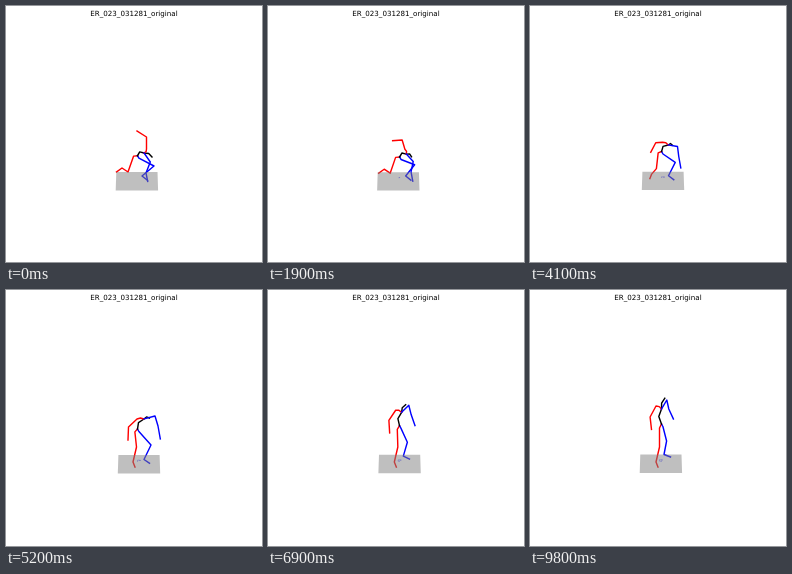
An HTML page for the animation above (9.9 s loop, 256x256 px).

```html
<!DOCTYPE html>
<html lang="en">
<head>
<meta charset="utf-8">
<title>Skeleton motion</title>
<style>
html, body { margin: 0; width: 100%; height: 100%; overflow: hidden; background: #fff; }
svg { display: block; width: 100vw; height: 100vh; }
text { font: 7.11px "DejaVu Sans", sans-serif; text-anchor: middle; text-rendering: geometricPrecision; }
polyline { fill: none; stroke-width: 1.42; stroke-linecap: square; stroke-linejoin: round; }
</style>
</head>
<body>
<svg viewBox="0 0 256 256">
  <text x="128" y="10.4">ER_023_031281_original</text>
  <polyline id="trail" stroke="blue" style="stroke-width:.36"/>
  <polyline id="rightLeg" stroke="red"/>
  <polyline id="leftLeg" stroke="blue"/>
  <polyline id="spine" stroke="black"/>
  <polyline id="rightArm" stroke="red"/>
  <polyline id="leftArm" stroke="blue"/>
  <polygon id="floor" fill="#808080" fill-opacity=".5"/>
</svg>
<script>
const LOOP = 9900, STEP = 100;

// Limbs run from the trunk outwards; hips, collar, neck and back are derived.
const crouch = {
  floor: [[110.3, 166]],
  trunk: [[131.5, 149.7], [138, 147], [146, 151]],
  rightLeg: [[122, 166], [116, 162], [110.5, 166]],
  leftLeg: [[148, 160], [136, 170], [141.5, 174.3]],
  rightArm: [[140.5, 143], [140.5, 131], [131, 125]],
  leftArm: [[144.3, 156], [140, 167], [141.7, 175.5]]
};
const reach = {
  floor: [[112.4, 166.4]],
  trunk: [[131.7, 152], [138.5, 149], [141.5, 150.5]],
  rightLeg: crouch.rightLeg.map(([x, y]) => [x + 0.3, y + 2.2]),
  leftLeg: [[145.5, 157.7], [139, 170], [144, 174]],
  rightArm: [[134, 143.5], [129, 136.5], [119.5, 142.5]],
  leftArm: [[146, 155], [145.5, 165], [147.3, 175]]
};
const bent = {
  floor: [[112.4, 165]],
  trunk: [[131.5, 139], [138, 129], [143.5, 128]],
  rightLeg: [[130.5, 157], [127, 172], [129, 177]],
  leftLeg: [[145, 155], [138, 169.5], [143.5, 173.3]],
  rightArm: [[131, 129], [122.5, 137], [122, 150]],
  leftArm: [[149, 126], [152, 136], [154.3, 149]]
};
const upright = {
  floor: [[110.3, 164.6]],
  trunk: [[131.5, 134], [131.5, 119], [134.8, 108.3]],
  rightLeg: bent.rightLeg.map(([x, y]) => [x - 1, y]),
  leftLeg: [[136.6, 151], [134, 164.5], [140.5, 167]],
  rightArm: [[126, 116], [120.1, 127], [121.5, 139.4]],
  leftArm: [[136.8, 110], [138.8, 119], [143.4, 129]]
};
const moves = [
  { from: crouch, to: reach, start: 0, end: 3000, power: 1.3 },
  { from: reach, to: bent, start: 3000, end: 5200, power: 1 },
  { from: bent, to: upright, start: 5200, end: 8500, power: 0.6 }
];

const mix = (a, b, u) => a + (b - a) * u;

function sample(part, t) {
  const { from, to, start, end, power } = moves.find(m => t < m.end) || moves.at(-1);
  const u = Math.min(1, (t - start) / (end - start)) ** power;
  return from[part].map((p, i) => p.map((v, k) => mix(v, to[part][i][k], u)));
}

// Midpoint of a and b, pushed sideways by the given amount.
function bulge([ax, ay], [bx, by], amount) {
  const dx = bx - ax, dy = by - ay, k = amount / Math.hypot(dx, dy);
  return [ax + dx / 2 + dy * k, ay + dy / 2 - dx * k];
}

function floorAt(t) {
  const [[x, y]] = sample("floor", t);
  return [x - 1.9 * Math.sin(Math.PI * Math.min(1, t / 3000)), y];
}

const setPoints = (id, points) =>
  document.getElementById(id).setAttribute("points", points.join(" "));

function draw(t) {
  const [pelvis, chest, head] = sample("trunk", t);
  const rightArm = sample("rightArm", t);
  const [px, py] = pelvis;
  const rise = Math.max(0, (150 - py) / 16);
  const rightHip = [px - 4 + 2 * rise, py + 0.4 + 3.6 * rise];
  const leftHip = [px + 1.4, py + 2.5];

  setPoints("rightLeg", [pelvis, rightHip, ...sample("rightLeg", t)]);
  setPoints("leftLeg", [pelvis, leftHip, ...sample("leftLeg", t)]);
  setPoints("spine", [pelvis, bulge(pelvis, chest, 2.7), chest, bulge(chest, head, 1.6), head]);
  setPoints("rightArm", [chest, bulge(chest, rightArm[0], -1), ...rightArm]);
  setPoints("leftArm", [chest, ...sample("leftArm", t)]);

  const [x, y] = floorAt(t);
  setPoints("floor", [x, y, x + 41.2, y, x + 41.8, y + 18.4, x - 0.6, y + 18.4]);

  // The body stays centred, so its past ground path moves with the floor.
  const path = [];
  for (let s = 0; s <= t; s += STEP) {
    const [oldX, oldY] = floorAt(s);
    path.push([131.5 + x - oldX, 171.5 + y - oldY]);
  }
  setPoints("trail", path);
}

function tick() {
  draw(Math.floor(performance.now() % LOOP / STEP) * STEP);
  requestAnimationFrame(tick);
}
tick();
</script>
</body>
</html>
```
